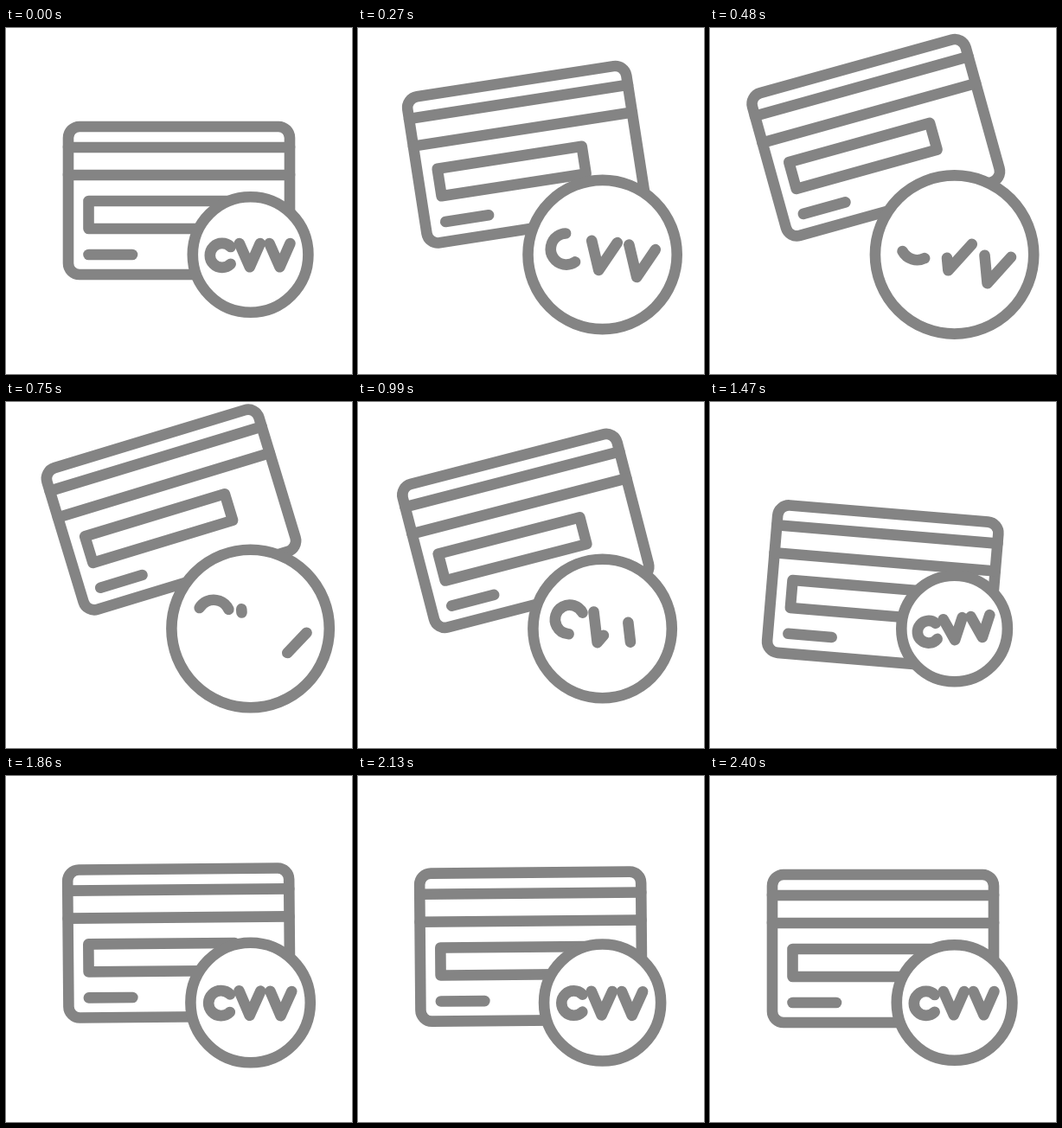
Recreate the animation shown at these times as an HTML page with a canvas. Size 400x400 px, loop 4.43 s.

```html
<!DOCTYPE html>
<html lang="en">
<head>
<meta charset="utf-8">
<title>Card security code</title>
<style>
  html, body { margin: 0; width: 100%; height: 100%; overflow: hidden; background: #fff; }
  canvas { display: block; width: 400px; height: 400px; }
</style>
</head>
<body>
<canvas id="stage" width="400" height="400"></canvas>
<script>
const ctx = document.getElementById('stage').getContext('2d');
const LOOP = 4430, STEP = 30, MOVE_END = 2400;
const GREY = '#848484', LINE = 12.6, REST_R = 66.8;
const RAD = Math.PI / 180;
const COUNTER_TILT = -1.18; // letters turn against the card

// time, card dx, card dy, card tilt in degrees, badge radius
const POSES = [
  [0, 0, 0, 0, REST_R],
  [270, -5.1, -53.3, -8.8, 86.1],
  [600, -9, -77, -17.3, 92.8],
  [750, -9, -75, -16.9, 91.2],
  [990, -6.2, -50.6, -14.5, 80.2],
  [1080, -5, -33, -11, 72.6],
  [1450, -0.3, 15, 4.8, 61.2],
  [1620, -0.2, 5, 3.7, 64.8],
  [1850, -0.2, -6.5, -0.5, 69.2],
  [2160, -0.2, -2, -0.5, 67.4],
  [2400, 0, 0, 0, REST_R]
];

const rate = (i, k) =>
  (POSES[i + 1][k] - POSES[i][k]) / (POSES[i + 1][0] - POSES[i][0]);

// Flat at turning points, harmonic mean elsewhere
function slope(i, k) {
  if (i === 0 || i === POSES.length - 1) return 0;
  const a = rate(i - 1, k), b = rate(i, k);
  return a * b <= 0 ? 0 : 2 * a * b / (a + b);
}

function pose(t, k) {
  let i = 0;
  while (i < POSES.length - 2 && t >= POSES[i + 1][0]) i++;
  const p = POSES[i], q = POSES[i + 1], h = q[0] - p[0];
  const u = (t - p[0]) / h, v = 1 - u;
  return p[k] * v * v * (1 + 2 * u) + q[k] * u * u * (3 - 2 * u)
    + h * u * v * (v * slope(i, k) - u * slope(i + 1, k));
}

function polyline(points) {
  ctx.beginPath();
  points.forEach(([x, y]) => ctx.lineTo(x, y));
}

function strokeLine(x1, y, x2) {
  polyline([[x1, y], [x2, y]]);
  ctx.stroke();
}

function drawCard(t) {
  ctx.save();
  ctx.translate(200 + pose(t, 1), 199.5 + pose(t, 2));
  ctx.rotate(pose(t, 3) * RAD);
  ctx.beginPath();
  ctx.roundRect(-128, -85.5, 256, 171, 13);
  ctx.stroke();
  strokeLine(-128, -61.5, 128);
  strokeLine(-128, -29.5, 128);
  ctx.strokeRect(-104.5, 0.5, 169, 32);
  strokeLine(-104.5, 62.5, -54);
  ctx.restore();
}

// Each letter is wiped away from its start, then written again
function letterSpan(t, delay) {
  const out = 587, back = 620, u = t - delay;
  if (u < 0) return [0, 1];
  if (u < out) return [(u / out) ** 2, 1];
  const left = 1 - Math.min(1, (u - out) / back);
  return [0, 1 - left * left];
}

function strokeSpan(length, [from, to]) {
  if (to - from < 0.005) return;
  if (to - from < 1) {
    ctx.setLineDash([length * (to - from), length * 2]);
    ctx.lineDashOffset = -length * from;
  }
  ctx.stroke();
  ctx.setLineDash([]);
}

function drawV(x, s, span) {
  polyline([[x - 12, -13], [x, 14.3], [x + 12, -13]].map(p => p.map(c => c * s)));
  strokeSpan(2 * Math.hypot(12, 27.3) * s, span);
}

function drawBadge(t) {
  const r = pose(t, 4), s = r / REST_R;
  ctx.save();
  ctx.translate(282.6, 262);
  ctx.beginPath();
  ctx.arc(0, 0, r, 0, 2 * Math.PI);
  ctx.fill();
  ctx.stroke();

  ctx.rotate(COUNTER_TILT * pose(t, 3) * RAD);
  ctx.beginPath();
  ctx.arc(-32.8 * s, 0.9 * s, 14 * s, -45 * RAD, 45 * RAD, true);
  strokeSpan(14 * s * 270 * RAD, letterSpan(t, 0));
  drawV(-0.8, s, letterSpan(t, 147));
  drawV(33.9, s, letterSpan(t, 294));
  ctx.restore();
}

function frame(now) {
  const t = Math.min(MOVE_END, Math.floor((now % LOOP) / STEP) * STEP);
  ctx.fillStyle = '#fff';
  ctx.fillRect(0, 0, 400, 400);
  ctx.strokeStyle = GREY;
  ctx.lineWidth = LINE;
  ctx.lineCap = ctx.lineJoin = 'round';
  drawCard(t);
  drawBadge(t);
}

const start = performance.now();
function tick() {
  frame(performance.now() - start);
  requestAnimationFrame(tick);
}
tick();
</script>
</body>
</html>
```
